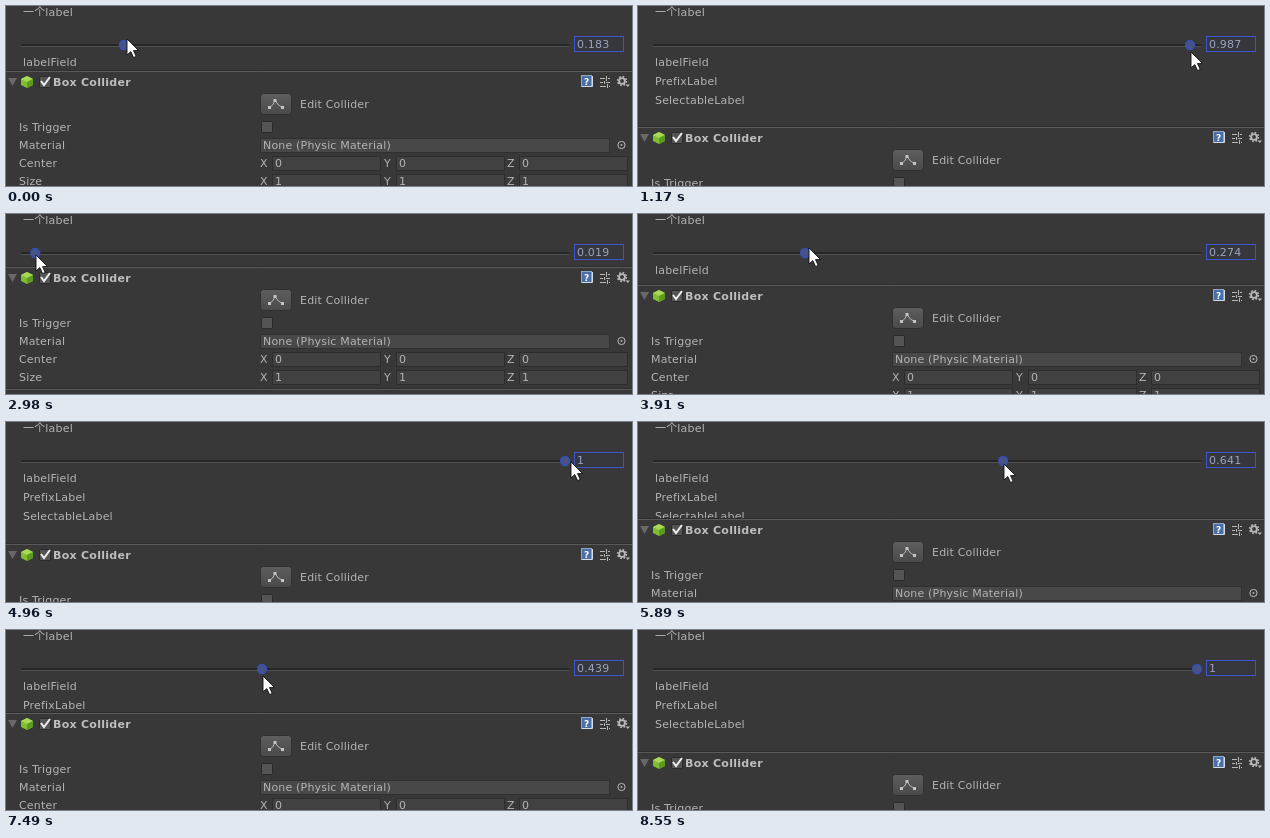
Recreate the animation shown at these times as an HTML page. Size 626x180 px, loop 9510 ms.

```html
<!DOCTYPE html>
<html lang="en">
<head>
<meta charset="utf-8">
<title>Inspector slider</title>
<style>
html, body { margin: 0; width: 100%; height: 100%; overflow: hidden; background: #383838; }
svg { display: block; }
text { font: 11px "DejaVu Sans", "Noto Sans CJK SC", "Noto Sans CJK", sans-serif; letter-spacing: .18px; fill: #b4b4b4; white-space: pre; }
.bold { font-weight: bold; letter-spacing: .28px; fill: #bebebe; }
.field { fill: #414141; stroke: #2d2d2d; }
.box { fill: #545454; stroke: #2a2a2a; }
.line { fill: none; stroke: #b8b8b8; }
</style>
</head>
<body>
<svg width="626" height="180" viewBox="0 0 626 180">
  <defs>
    <clipPath id="fade"><rect id="fadeRect" x="0" y="47" width="626" height="20"/></clipPath>
    <linearGradient id="btn" x2="0" y2="1"><stop stop-color="#5e5e5e"/><stop offset="1" stop-color="#4a4a4a"/></linearGradient>
  </defs>
  <rect width="626" height="180" fill="#383838"/>
  <text x="17" y="10">一个label</text>

  <rect x="15" y="38" width="548" height="2" rx="1" fill="#262626"/>
  <rect x="15" y="40" width="548" height="1" fill="#505050"/>
  <circle id="thumb" cy="39" r="4.4" fill="#465288" stroke="#3450b4" stroke-width="1.5"/>
  <rect x="568.5" y="30.5" width="49" height="15" fill="#36373c" stroke="#3d55cc"/>
  <text id="num" x="571" y="42" style="fill:#9aa4be"></text>

  <g clip-path="url(#fade)">
    <text x="17" y="60">labelField</text>
    <text x="17" y="79">PrefixLabel</text>
    <text x="17" y="98">SelectableLabel</text>
  </g>

  <!-- y = 0 is the middle of the component header -->
  <g id="panel">
    <path d="M0-11.5H626M0 110.5H626" stroke="#2e2e2e"/>
    <path d="M0-10.5H626M0 111.5H626" stroke="#5a5a5a"/>
    <path d="M2-4H11L6.5 4Z" fill="#686868"/>
    <path d="M21-6L27-3V3L21 6L15 3V-3Z" fill="#7fbd32"/>
    <path d="M21-6L27-3L21 0L15-3Z" fill="#a8d858"/>
    <path d="M21 0L27-3V3L21 6Z" fill="#5f9a20"/>
    <rect class="box" x="33.5" y="-5.5" width="11" height="11" rx="1"/>
    <path d="M35-1L38 3L44-5" fill="none" stroke="#eee" stroke-width="2"/>
    <text class="bold" x="47" y="4">Box Collider</text>

    <rect x="575.5" y="-6.5" width="10" height="11" fill="#4a6ea8" stroke="#90a8c8"/>
    <path d="M576 4.5H586.5V-6" fill="none" stroke="#d4dce6"/>
    <text x="578" y="2.5" style="font-size:9px;font-weight:bold;fill:#fff">?</text>
    <path class="line" d="M594-3.5H599M602-3.5H604M594 .5H597M600 .5H604M594 4.5H600M603 4.5H604M600.5-6V-1M598.5-1V2M601.5 2V6"/>
    <g transform="translate(616 -1)" fill="none" stroke="#b8b8b8">
      <circle r="2.9" stroke-width="1.9"/>
      <circle r="4.4" stroke-width="1.6" stroke-dasharray="1.7 1.756"/>
    </g>
    <path d="M619.5 2.5H624L621.75 5Z" fill="#b8b8b8"/>

    <rect x="254.5" y="11.5" width="31" height="21" rx="3" fill="url(#btn)" stroke="#303030"/>
    <path class="line" d="M263.5 25.5Q267 24 269 18.5Q272 24 276.5 25.5"/>
    <path d="M262 24h3v3h-3zM267.5 17h3v3h-3zM275 24h3v3h-3z" fill="#c4c4c4"/>
    <text x="294" y="26">Edit Collider</text>

    <text x="13" y="49">Is Trigger</text>
    <rect class="box" x="255.5" y="39.5" width="11" height="11" rx="1"/>
    <text x="13" y="67">Material</text>
    <rect x="254.5" y="56.5" width="349" height="14" fill="#484848" stroke="#303030"/>
    <text x="257" y="67">None (Physic Material)</text>
    <circle class="line" cx="615.5" cy="63" r="3.6"/>
    <circle cx="615.5" cy="63" r="1" fill="#b0b0b0"/>
    <g id="vectors"></g>
  </g>

  <path id="cursor" d="M0 0V16L3.8 12.6L6.6 18.6L9.2 17.4L6.5 11.6H11.6Z" fill="#fff" stroke="#111" stroke-width=".9"/>
</svg>
<script>
const $ = id => document.getElementById(id);
const LOOP = 9510, STEP = 120;

const row = (name, y, n) => `<text x="13" y="${y + 4}">${name}</text>` +
  ["X", "Y", "Z"].map((axis, i) => {
    const x = Math.round(254 + i * 123.5);
    return `<text x="${x}" y="${y + 4}">${axis}</text>
      <rect class="field" x="${x + 12.5}" y="${y - 6.5}" width="108" height="14"/>
      <text x="${x + 15}" y="${y + 4}">${n}</text>`;
  }).join("");
$("vectors").innerHTML = row("Center", 81, 0) + row("Size", 99, 1);

// Screen refreshes [first, last, count]: regular steps with a short stall midway
const runs = [[120, 1050, 8], [1170, 1710, 5], [2020, 2980, 8], [3100, 4030, 8],
  [4180, 5200, 9], [5350, 6310, 8], [6460, 7490, 9], [7610, 8550, 8]];
const ticks = [0];
for (const [a, b, n] of runs)
  for (let i = 0; i < n; i++) ticks.push(i < n / 2 ? a + STEP * i : b - STEP * (n - 1 - i));

// [time, slider value, pointer x offset from thumb, pointer y]
const keys = [
  [0, .183, 3, 33], [1170, .987, 1.5, 46], [1710, .995, 1.5, 46], [2020, .995, 1.5, 46],
  [2980, .019, .5, 41], [3910, .274, 4, 34], [4830, 1, 4, 39], [4960, 1, 6, 40],
  [5200, 1, 4, 40], [6460, 0, -1, 48], [6700, 0, -1, 49], [8420, 1, 4, 42], [8550, 1, 4, 42]
];

// Monotone cubic through the keys
const secant = (i, c) => (keys[i + 1][c] - keys[i][c]) / (keys[i + 1][0] - keys[i][0]);
function slope(i, c) {
  if (i === 0) return secant(0, c);
  if (i === keys.length - 1) return 0;
  const a = secant(i - 1, c), b = secant(i, c);
  return a * b > 0 ? 2 * a * b / (a + b) : 0;
}
function sample(t, c) {
  let i = 0;
  while (i < keys.length - 2 && t >= keys[i + 1][0]) i++;
  const [p, q] = [keys[i], keys[i + 1]], h = q[0] - p[0];
  const u = Math.min(1, (t - p[0]) / h), w = 1 - u;
  return p[c] * (1 + 2 * u) * w * w + q[c] * u * u * (3 - 2 * u) +
    h * u * w * (slope(i, c) * w - slope(i + 1, c) * u);
}

function draw(time) {
  const t = ticks.findLast(k => k <= time);
  const v = Number(sample(t, 1).toFixed(3));
  const x = 19 + 540 * v;
  const head = v > 0 ? Math.round(62.7 + 70.3 * v) : 61;
  $("thumb").setAttribute("cx", x);
  $("num").textContent = v;
  $("panel").setAttribute("transform", `translate(0 ${head})`);
  $("fadeRect").setAttribute("height", v > 0 ? head - 59 : 0);
  $("cursor").setAttribute("transform",
    `translate(${Math.round(x + sample(t, 2))} ${Math.round(sample(t, 3))})`);
  $("cursor").style.display = t < 8550 ? "" : "none";
}

let start;
function loop(now) {
  start ??= now;
  draw((now - start) % LOOP);
  requestAnimationFrame(loop);
}
draw(0);
requestAnimationFrame(loop);
</script>
</body>
</html>
```
